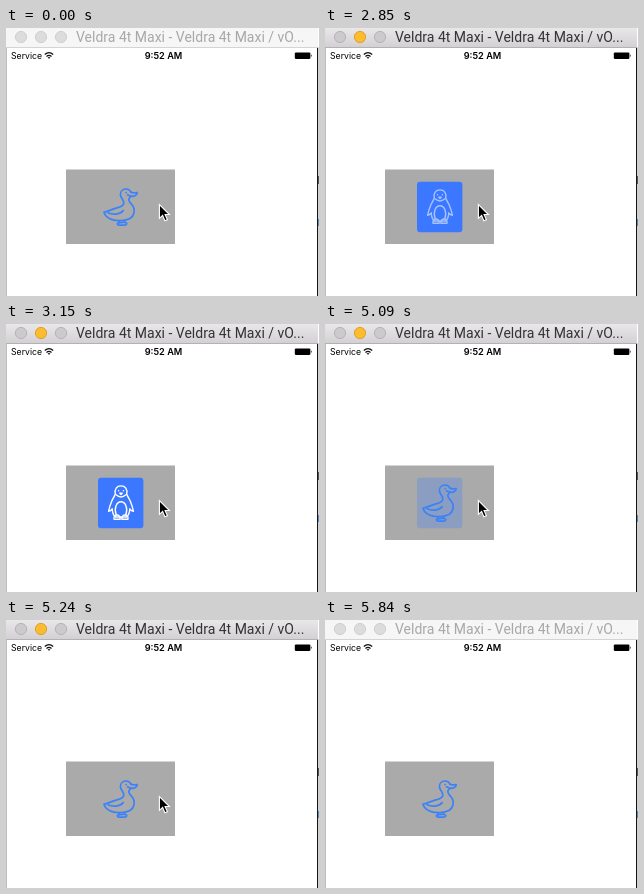
Recreate the animation shown at these times as an HTML page. Size 313 by 268 pixels, loop 5940 ms.

```html
<!DOCTYPE html>
<html lang="en">
<head>
<meta charset="utf-8">
<style>
  html, body { margin: 0; width: 100%; height: 100%; overflow: hidden; background: #fff; }
  svg { display: block; width: 313px; height: 268px; }
  .line { fill: none; stroke-width: 1.7; stroke-linecap: round; stroke-linejoin: round; }
  .title { font: 14px Roboto, sans-serif; }
  .status { font: 8.7px Inter, sans-serif; }
  .clock { font: 600 9.2px Inter, sans-serif; text-anchor: middle; }
</style>
</head>
<body>
<svg viewBox="0 0 313 268">
  <defs>
    <linearGradient id="bar" x2="0" y2="1">
      <stop stop-color="#e9e7e9"/><stop offset="1" stop-color="#d2d0d2"/>
    </linearGradient>
    <g id="duck">
      <path d="M125 164.3C124 161.8 121.8 160.9 119.8 161C116.5 161.2 114.3 163.6 114.4 166.6C114.5 170 118.2 172 117.8 175.3C117.4 178.3 113.8 179.2 110 180.1C106 181.2 102.5 183.4 98 184.2C99 187.6 101.8 190 105.5 191.4C111 193.3 119.5 193 124.3 190.2C128.3 187.7 129 182.6 127.5 179.1C126 175.8 123 174.6 122.8 171.8C122.7 170 124.2 169.2 125 168.2"/>
      <path d="M125 164.3C127.2 165.4 129.2 164.5 131.2 164.6C131 167.2 128.2 168.7 125 168.2L121.5 166.8"/>
      <path d="M102 184.8C107 187 113.8 186.8 117.2 182.6"/>
      <path d="M113.2 193L112.7 194.8M118.5 193L118.8 194.2M112.7 194.8C110.7 195.2 111.2 197.1 113.3 197.1H118.3C121 197.1 121.8 195 118.8 194.2Z"/>
      <path d="M120.1 164.6h.1"/>
    </g>
    <g id="penguin">
      <path d="M109.3 170C108.3 165 110.8 161.9 115 161.9S121.7 165 120.7 170C121.4 172.4 123 174.3 124.2 177C125.6 180.3 126.8 183.8 127.4 187.3C125.7 187 124.7 186 123.8 184.8C123.7 188.4 122.4 191.4 120.7 193H109.3C107.6 191.4 106.3 188.4 106.2 184.8C105.3 186 104.3 187 102.6 187.3C103.2 183.8 104.4 180.3 105.8 177C107 174.3 108.6 172.4 109.3 170Z"/>
      <path d="M110.5 171C113 173.6 117 173.6 119.5 171M110.2 190.5C107.8 184.5 110.4 177.8 115 177.8S122.2 184.5 119.8 190.5"/>
      <path d="M114.2 195.2H108C107.5 192.7 109.1 191 111 191S114.4 192.7 114.2 195.2ZM122 195.2H115.8C115.6 192.7 117.1 191 119 191S122.5 192.7 122 195.2Z"/>
      <path d="M112.5 166.7h.1M117.4 166.7h.1M113.8 169.3H116.2L115 170.4Z"/>
    </g>
  </defs>

  <rect width="313" height="268" fill="#fff"/>
  <rect y="20" width="1" height="248" fill="#bdbdbd"/>
  <rect x="311" y="19" width="1.2" height="249" fill="#151515"/>
  <path d="M312.5 148v8" stroke="#555"/>
  <path d="M312.5 191v7" stroke="#5d88b8"/>

  <rect id="head" width="312" height="19.5"/>
  <path id="rule" d="M0 19.5H312"/>
  <g id="lights">
    <circle cx="15" cy="9" r="5.6"/><circle cx="35" cy="9" r="5.6"/><circle cx="55" cy="9" r="5.6"/>
  </g>
  <text id="name" class="title" x="70" y="14">Veldra 4t Maxi - Veldra 4t Maxi / vO...</text>

  <text class="status" x="5" y="31">Service</text>
  <g fill="none" stroke="#111" stroke-width="1.3">
    <path d="M38.8 26.5Q43 22.8 47.2 26.5M40.5 28.5Q43 26.3 45.5 28.5"/>
    <path d="M42.2 29.4h1.6L43 30.4Z" stroke-width=".8" fill="#111"/>
  </g>
  <text class="clock" x="157.5" y="31">9:52 AM</text>
  <rect x="288.8" y="24.4" width="15.6" height="6.6" rx="1.2"/>
  <path d="M305 26.3q1.5 1.4 0 2.8z"/>

  <rect x="60" y="141.5" width="109" height="74.5" fill="#aaa"/>
  <rect id="button" x="92" y="153.8" width="45.4" height="50.4" rx="3"/>
  <g class="line">
    <use id="blue" href="#duck" stroke="#3c82f7"/>
    <use id="bird" href="#penguin" stroke="#fff" stroke-width="1.4"/>
    <use id="white" href="#duck" stroke="#fff"/>
  </g>
  <path id="cursor" d="M0 0V13.8L3.2 10.9L5.5 16.3L8 15.2L5.7 10H10Z" fill="#000" stroke="#fff" stroke-width="1.1"/>
</svg>
<script>
const LOOP = 5940;
const el = id => document.getElementById(id);
const set = (id, key, value) => el(id).setAttribute(key, value);

// start, active window, cursor, button alpha, button colour, blue duck, penguin, white duck
const here = [153.4, 176.5], away = [201.9, 218.5];
const deep = '#3b78ff', soft = '#4482f6';
const steps = [
  [0,    0, here, 0,  deep, 1,   0,   0],
  [1500, 1, here, 0,  deep, .26, 0,   0],
  [2850, 1, here, 1,  deep, 0,   .55, 0],
  [3000, 1, here, 1,  deep, 0,   .9,  0],
  [3150, 1, here, 1,  deep, 0,   1,   0],
  [3740, 1, here, 1,  deep, 0,   .45, .5],
  [3890, 1, here, 1,  soft, 0,   0,   1],
  [5090, 1, here, .3, soft, 1,   0,   0],
  [5240, 1, here, 0,  soft, 1,   0,   0],
  [5390, 1, away, 0,  soft, 1,   0,   0],
  [5540, 1, null, 0,  soft, 1,   0,   0],
  [5840, 0, null, 0,  soft, 1,   0,   0]
];

function draw(now) {
  const t = now % LOOP;
  const [, active, cursor, alpha, fill, blue, bird, white] = steps.findLast(s => s[0] <= t);

  set('head', 'fill', active ? 'url(#bar)' : '#f6f6f6');
  set('rule', 'stroke', active ? '#b3b1b3' : '#d4d4d4');
  set('name', 'fill', active ? '#343434' : '#a8a8a8');
  [...el('lights').children].forEach((dot, i) => {
    const amber = active && i === 1;
    dot.setAttribute('fill', amber ? '#fdbc2f' : active ? '#cccacc' : '#dcdcdc');
    dot.setAttribute('stroke', amber ? '#dfa023' : active ? '#b5b3b5' : '#cfcfcf');
  });

  set('button', 'fill', fill);
  set('button', 'opacity', alpha);
  set('blue', 'opacity', blue);
  set('bird', 'opacity', bird);
  set('white', 'opacity', white);
  set('cursor', 'visibility', cursor ? 'visible' : 'hidden');
  if (cursor) set('cursor', 'transform', `translate(${cursor})`);
  requestAnimationFrame(() => draw(performance.now()));
}
draw(performance.now());
</script>
</body>
</html>
```
